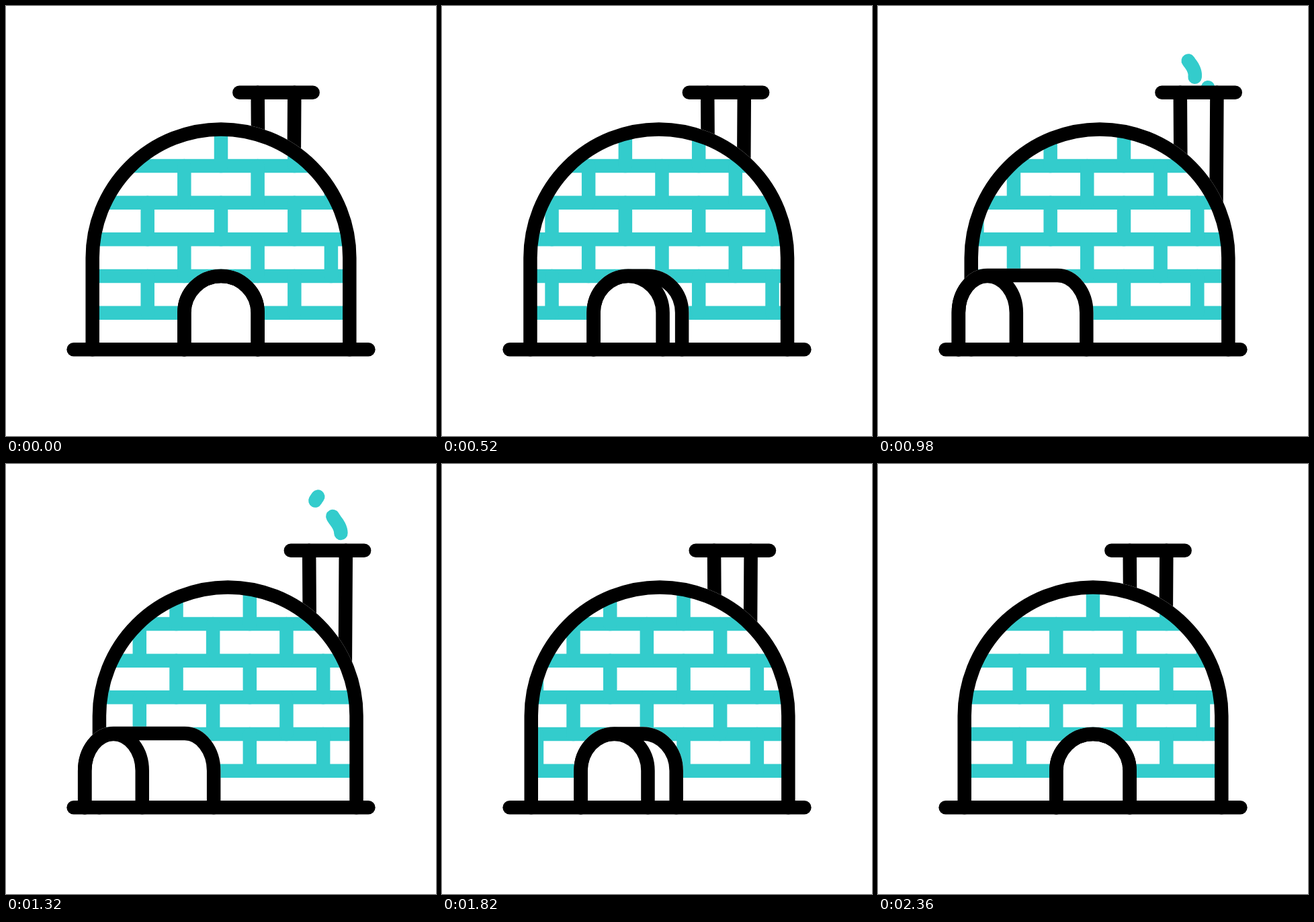
Recreate the animation shown at these times as an HTML page with a canvas. Size 640 by 640 pixels, loop 2.4 s.

```html
<!DOCTYPE html>
<html lang="en">
<head>
<meta charset="utf-8">
<title>Igloo</title>
<style>
  html, body { margin: 0; height: 100%; overflow: hidden; background: #fff; }
  canvas { display: block; }
</style>
</head>
<body>
<canvas id="stage" width="640" height="640"></canvas>
<script>
const ctx = document.getElementById('stage').getContext('2d');
const TEAL = '#3cc', UNIT = 54.66, GROUND = 511.3, LOOP = 2400, STEP = 20;

const clamp = v => Math.max(0, Math.min(1, v));
const smooth = u => u * u * (3 - 2 * u);

// Cubic bezier easing (.77, 0, .23, 1), solved by bisection
function ease(x) {
  let lo = 0, hi = 1;
  for (let i = 0; i < 30; i++) {
    const s = (lo + hi) / 2, r = 1 - s;
    if (3 * r * r * s * .77 + 3 * r * s * s * .23 + s ** 3 < x) lo = s; else hi = s;
  }
  return smooth(lo);
}

// How far the igloo has turned: 0 = front view, 1 = side view
const turnAt = t => t < 1200 ? ease(t / 1200) : 1 - ease(clamp((t - 1200) / 1180));

function stroke(path, color = '#000') {
  ctx.strokeStyle = color;
  ctx.stroke(path);
}

function line(x1, y1, x2, y2, color) {
  const path = new Path2D();
  path.moveTo(x1, y1);
  path.lineTo(x2, y2);
  stroke(path, color);
}

function cover(path) {
  ctx.fillStyle = '#fff';
  ctx.fill(path);
  stroke(path, '#fff');
}

// Arch whose top may be stretched between two apexes
function arch(left, apex1, apex2, right, top, spring) {
  const path = new Path2D(), ry = spring - top;
  path.moveTo(left, GROUND);
  path.lineTo(left, spring);
  path.ellipse(apex1, spring, apex1 - left, ry, 0, Math.PI, 1.5 * Math.PI);
  path.ellipse(apex2, spring, right - apex2, ry, 0, 1.5 * Math.PI, 2 * Math.PI);
  path.lineTo(right, GROUND);
  return path;
}

function smoke(x, start, t) {
  const head = smooth(clamp((t - start) / 640));
  const tail = smooth(clamp((t - start - 150) / 640));
  if (head <= 0 || tail >= 1) return;
  const path = new Path2D();
  for (let i = 0; i <= 24; i++) {
    const s = 2 * (tail + (head - tail) * i / 24);
    const upper = s > 1 ? 1 : 0, k = s - upper, r = 1 - k;
    const dx = 30 * k * r * (upper ? -1 : 1);
    const dy = 39 * k * r * r + 70.2 * k * k * r + 36.4 * k ** 3;
    path.lineTo(x + dx, 121.4 - 36.4 * upper - dy);
  }
  stroke(path, TEAL);
}

function chimney(x) {
  line(x - UNIT / 2, 128.7, x - UNIT / 2 + 1.2, 330);
  line(x + UNIT / 2, 128.7, x + UNIT / 2 - 1.2, 330);
  line(x - UNIT, 128.7, x + UNIT, 128.7);
}

function bricks(shift) {
  const firstColumn = [320, 265.3, 210.7, 265.3, 210.7];
  firstColumn.forEach((first, row) => {
    const y = 238 + row * UNIT;
    line(0, y, 640, y, TEAL);
    for (let i = 0; i < 5; i++) {
      const x = first + i * 2 * UNIT - shift;
      line(x, y - UNIT, x, y, TEAL);
    }
  });
}

function igloo(turn) {
  const x = 320 + 10.3 * turn, r = 3.5 * UNIT;
  const dome = arch(x - r, x, x, x + r, 183.4, 183.4 + r);
  cover(dome);
  ctx.save();
  ctx.clip(dome);
  bricks(177 * turn);
  ctx.restore();
  stroke(dome);
}

function entrance(turn) {
  const left = 265.3 - 149.1 * turn, right = 374.7 - 173.1 * turn;
  const apex = (left + right) / 2, spring = 456.6;
  const tunnel = arch(left, apex, 320 - 54.4 * turn, 374.7 - 66 * turn, 401.9 - .8 * turn, spring);
  cover(tunnel);
  stroke(tunnel);
  stroke(arch(left, apex, apex, right, 401.9, spring));
}

function draw(now) {
  const t = Math.floor(now % LOOP / STEP) * STEP;
  const turn = turnAt(t);
  ctx.clearRect(0, 0, 640, 640);
  ctx.lineWidth = 20.5;
  ctx.lineCap = ctx.lineJoin = 'round';
  smoke(464.3, 640, t);
  smoke(490.9, 960, t);
  chimney(402 + 77 * turn);
  igloo(turn);
  entrance(turn);
  line(100.6, GROUND, 539.4, GROUND);
}

let startTime;
function tick(now) {
  startTime ??= now;
  draw(now - startTime);
  requestAnimationFrame(tick);
}
requestAnimationFrame(tick);
</script>
</body>
</html>
```
